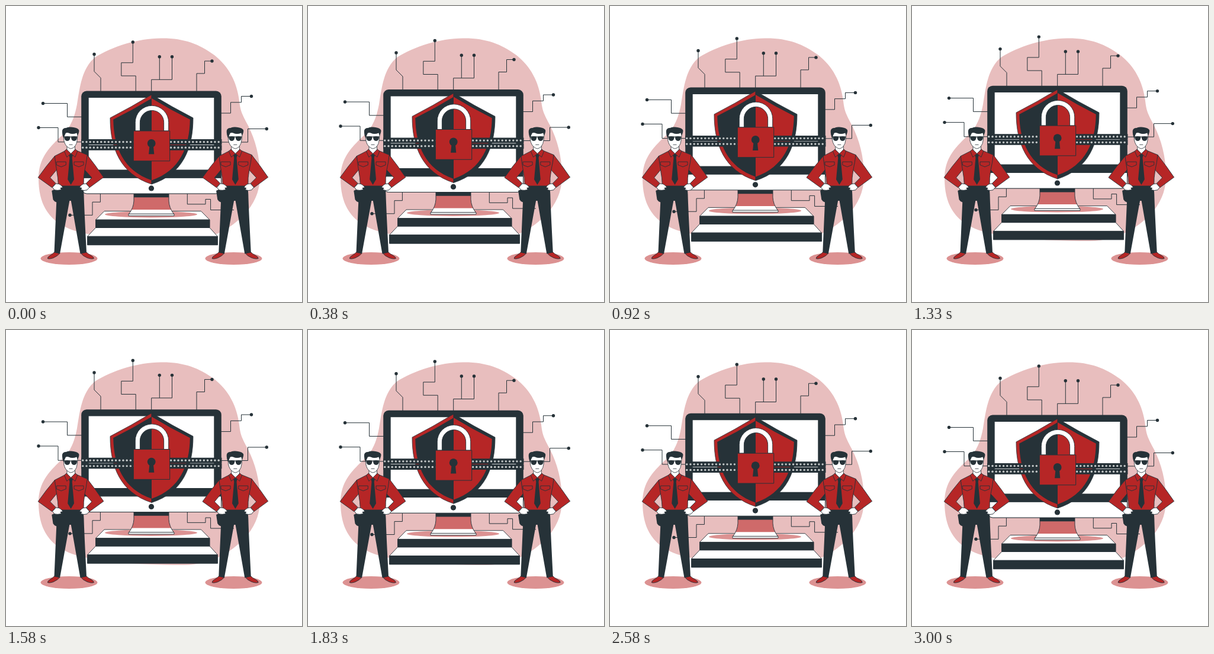
An HTML page with a canvas that plays this animation: 500x500 px, repeating every 3040 ms.

```html
<!DOCTYPE html>
<html lang="en">
<head>
<meta charset="utf-8">
<title>Guarded computer</title>
<style>
html, body { margin: 0; width: 100%; height: 100%; overflow: hidden; background: #fff; }
canvas { display: block; width: 500px; height: 500px; }
</style>
</head>
<body>
<canvas id="stage"></canvas>
<script>
const DARK = '#263238', RED = '#b62626', WHITE = '#fff';
const BLOB = '#e8bebe', SHADE = '#dc9292', NECK = '#cf6a6a';
const LOOP = 3040, RISE = 10, HALF = 1500;

const canvas = document.getElementById('stage');
const ctx = canvas.getContext('2d');
const ratio = window.devicePixelRatio || 1;
canvas.width = canvas.height = Math.round(500 * ratio);

function paint(path, fill, stroke, width = 0.9) {
  if (fill) {
    ctx.fillStyle = fill;
    ctx.fill(path);
  }
  if (stroke) {
    ctx.strokeStyle = stroke;
    ctx.lineWidth = width;
    ctx.stroke(path);
  }
}

const shape = (d, fill, stroke, width) => paint(new Path2D(d), fill, stroke, width);

function oval(x, y, rx, ry, fill, stroke, width) {
  const p = new Path2D();
  p.ellipse(x, y, rx, ry, 0, 0, Math.PI * 2);
  paint(p, fill, stroke, width);
}

function box(x, y, w, h, fill, stroke, width, r = 0) {
  const p = new Path2D();
  p.roundRect(x, y, w, h, r);
  paint(p, fill, stroke, width);
}

function backdrop() {
  shape(`M262 54.5 C222 55 180 68 150 87 C128 106 125 136 120 166
    C114 198 104 210 92 221 C72 240 55 258 55 291 C55 333 70 360 106 376
    C142 391 220 397 300 397 C350 397 388 370 408 346 C424 326 429 306 429 287
    C429 254 421 226 409 202 C399 183 396 178 394 160 C390 128 376 102 352 83
    C326 64 300 54 262 54.5Z`, BLOB);
  oval(106.5, 426.5, 48, 10.5, SHADE);
  oval(384.5, 426.5, 48, 10.5, SHADE);
}

const wires = [
  'M149 81.5V110.5L160 121.5V145',
  'M214.3 61V95.8H194.8V118H219.2V145',
  'M259.3 85.8V124.3',
  'M280.5 85.8V124.3H245.7V152',
  'M348 93H335.5V114H322V145',
  'M414.5 152.5H397.5V162.8H379.5V181H363',
  'M440.3 207.5H408.5V230H363',
  'M62.5 164.5H103.5V187.3H128',
  'M55 205.5H88V229.7H128',
  'M108 353.3H146V331.2H159.4V316'
];

function circuits() {
  for (const d of wires) {
    shape(d, null, DARK, 1);
    const [x, y] = d.match(/[\d.]+/g).map(Number);
    oval(x, y, 2.7, 2.7, DARK);
  }
  shape('M306.3 316V334.8H337V326.5H345.6V344.5H385', null, DARK, 1);
}

function pedestal() {
  shape('M151.5 374.5H344L357.5 389.3H137.5Z', WHITE, DARK);
  box(137.5, 389.3, 220, 14.4, DARK, DARK);
  shape('M166 346.5H329.5L344 361.2H151.5Z', WHITE, DARK);
  box(151.5, 361.2, 192.6, 13.3, DARK, DARK);
  oval(245, 352, 78, 5.4, SHADE);

  const neck = new Path2D('M216 316V329Q215.5 341 207.5 351.5H283.5Q275.5 341 275 329V316Z');
  paint(neck, WHITE);
  ctx.save();
  ctx.clip(neck);
  box(200, 316, 90, 28, NECK);
  box(200, 316, 90, 7.3, DARK);
  ctx.restore();
  paint(neck, null, DARK);
  box(207, 351.2, 77, 3.2, WHITE, DARK);
}

function monitor() {
  box(127.2, 143.6, 236.6, 173.6, DARK, null, 0, 9);
  box(139.7, 155, 211.6, 121.5, WHITE);
  box(127.5, 290.3, 236, 26.7, WHITE, DARK, 1, [0, 0, 9, 9]);
  oval(245.5, 307.9, 4.6, 4.6, DARK);
}

// Half of the shield; side is -1 for left, 1 for right.
function shieldHalf(side, fill, core) {
  const at = (x, y) => `${246 + side * x} ${y}`;
  shape(`M${at(0, 149.8)}Q${at(35, 171)} ${at(70, 189)}
    C${at(70, 240)} ${at(53, 284)} ${at(0, 301)}Z`, fill, DARK, 0.8);
  shape(`M${at(0, 156)}Q${at(32, 175.5)} ${at(64.8, 191.8)}
    C${at(64, 238)} ${at(48, 278)} ${at(0, 294.5)}Z`, core);
}

function chain(y) {
  box(127, y - 4.5, 237.5, 9, DARK);
  for (let x = 129.8; x < 364; x += 6.2) {
    oval(x, y, 1.6, 1.6, '#e6e8e8');
    oval(x + 0.2, y, 0.7, 0.7, '#87908f');
  }
}

function padlock() {
  shape(`M218.3 211V196.5A28.2 28.2 0 0 1 274.7 196.5V211H266.6V196.5
    A20.1 20.1 0 0 0 226.4 196.5V211Z`, WHITE, DARK);
  box(215.3, 211, 61.4, 50.8, RED, DARK, 1);
  oval(245.7, 232, 6.9, 6.9, DARK);
  shape('M242.5 236H248.9L250.3 250.2H241.1Z', DARK);
}

function computer() {
  circuits();
  pedestal();
  monitor();
  shieldHalf(-1, RED, DARK);
  shieldHalf(1, DARK, RED);
  chain(229.6);
  chain(239.2);
  padlock();
}

function guard(dx) {
  ctx.save();
  ctx.translate(dx, 0);

  // Shoes and trousers
  shape('M82 415.5L91 417.5Q88 422 80 425.5Q73 428 70.3 426.5Q70 424 75 421Q80 418 82 415.5Z', RED, DARK);
  shape('M126.5 417.5L135.5 415.5Q138 418.5 144 421.5Q149 424.5 148.3 426.5Q144 428 137 425.3Q129 422 126.5 417.5Z', RED, DARK);
  shape(`M90 303.5H130.5L131.5 318Q132 340 136 416.5L125.5 418.5
    L109.8 329H107.3L91 418.5L81.5 416.5L85.2 331.5Q81 330 79.5 327
    L77.3 312Q82 309 88 310Z`, DARK);

  // Sleeves and torso
  shape('M82.3 253.5Q68 270 54.2 289.7L77.8 306.7L84 299.5L74.5 290L86 276Z', RED, DARK);
  shape('M137.2 251.5Q151 269 164.8 289.3L141 306.7L135.5 299.5L145 290L132 276Z', RED, DARK);
  shape(`M102 243.5L82.3 253.5Q83.5 265 85.5 277Q88 290 88.5 304H131
    Q130.5 290 133 277Q136 264 137.2 251.5L117.5 243.5Z`, RED, DARK);

  // Hands
  shape('M78.5 306.2L84.5 300Q90 300 93 302.8L96.2 306.5L92 307.5L93.5 310.5Q87 312 82 310.8Z', WHITE, DARK);
  shape('M140.8 306.2L135 300Q130 300 127 302.8L124 306.5L127.8 307.5L126.5 310.5Q132 312.5 137 310.8Z', WHITE, DARK);

  // Pockets
  for (const x of [85.3, 115]) {
    shape(`M${x} 263.2h16v5.3l-8 3.2l-8 -3.2z`, null, DARK);
  }

  // Neck, collar and tie
  shape('M103 233H116.5V243L109.8 250.5L103 243Z', WHITE, DARK, 0.8);
  shape('M106 250H113.3L111.7 256.5L115 293L109.6 302L104.2 293L107.5 256.5Z', DARK);
  shape('M102.2 242L109.6 249.3L102.8 255.3L98.5 245.3Z', RED, DARK);
  shape('M117.2 242L109.8 249.3L116.8 255.3L120.8 245.3Z', RED, DARK);

  // Head
  shape(`M97.5 214L97.8 227Q99.5 234.5 103.5 237.8Q107 240.8 109.5 241
    Q113 240.6 116 237.6Q119.8 233 120.3 226L121.5 213Z`, WHITE, DARK, 0.8);
  shape(`M97.5 224Q94.3 216 95 210.5Q96 205.8 101.5 206Q104 204 110 204.6
    Q118.5 205 122.5 208.5Q125 211 121 219L119.4 214.4Q112 217.4 106 214.4
    Q103 213 101 214.5L99 219Z`, DARK);
  for (const x of [103.5, 115]) {
    shape(`M${x - 5} 220.6q5 -1.2 10 0q0.2 7.4 -5 7.4q-5.2 0 -5 -7.4z`, DARK);
  }
  shape('M98 221.2H120.5', null, DARK, 1.2);
  shape('M106.5 234.3H112.5', null, DARK, 0.8);
  ctx.restore();
}

function draw(ms) {
  // 24 poses a second, with the last one held to the end of the loop
  const pose = Math.floor((ms % LOOP + 5) * 24 / 1000) * 1000 / 24;
  const t = Math.min(pose, HALF * 2);
  const lift = RISE * (1 - Math.abs(t - HALF) / HALF);

  ctx.setTransform(ratio, 0, 0, ratio, 0, 0);
  ctx.lineJoin = 'round';
  ctx.fillStyle = WHITE;
  ctx.fillRect(0, 0, 500, 500);
  backdrop();
  ctx.save();
  ctx.translate(0, -lift);
  computer();
  ctx.restore();
  guard(0);
  guard(277.8);
}

const start = performance.now();
function tick() {
  draw(performance.now() - start);
  requestAnimationFrame(tick);
}
tick();
</script>
</body>
</html>
```
